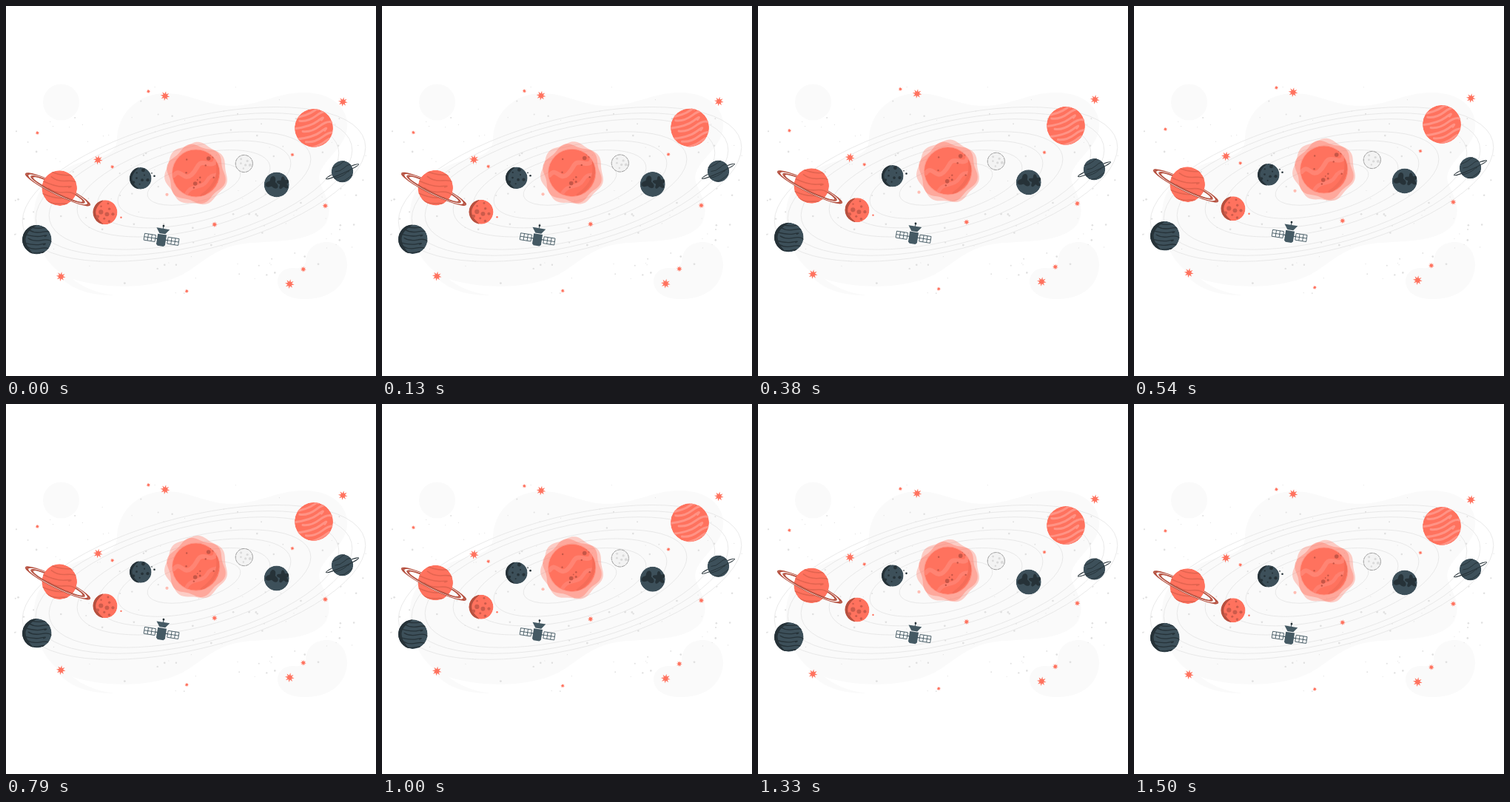
Recreate the animation shown at these times as an HTML page. Size 500 px wide and 500 px high, loop 1540 ms.

```html
<!DOCTYPE html>
<html lang="en">
<head>
<meta charset="utf-8">
<title>Solar system</title>
<style>
  html, body { margin: 0; height: 100%; overflow: hidden; background: #fff; }
  svg { display: block; width: 100vw; height: 100vh; }
</style>
</head>
<body>
<svg viewBox="0 0 500 500">
  <g fill="#fafafa">
    <circle cx="74.5" cy="130" r="24.5"/>
    <path d="M150 178C152 145 178 118 216 118C250 118 270 135 305 135C345 134 365 117 403 117C440 117 462 137 461 163C460 195 417 212 424 238C430 255 444 272 432 294C414 318 375 317 335 320C285 322 270 345 240 362C205 382 130 385 82 366C45 345 36 305 38 275C42 235 80 215 120 206C142 200 150 195 150 178Z"/>
    <path d="M405 345C406 328 418 319 434 319C451 319 461 333 461 350C460 376 440 395 408 396C383 397 367 388 367 371C368 358 380 353 390 354C399 355 404 352 405 345Z"/>
    <path d="M68 360Q92 392 147 391Q105 386 80 360Z"/>
  </g>
  <g id="dots"></g>
  <g id="orbits" fill="none" stroke="#e2e2e2" stroke-width=".7"></g>
  <g id="floating"></g>
</svg>
<script>
const CORAL = '#ff725e', RUST = '#b5503f', SLATE = '#455a64', DUSK = '#3d505a', NIGHT = '#263238';
const byId = id => document.getElementById(id);
const repeat = (count, draw) => Array.from({ length: count }, (_, i) => draw(i)).join('');
const circle = (x, y, r, fill) => `<circle cx="${x}" cy="${y}" r="${r}" fill="${fill}"/>`;
const path = (d, fill, extra = '') => `<path d="${d}" fill="${fill}" ${extra}/>`;
const line = (d, color, width) =>
  path(d, 'none', `stroke="${color}" stroke-width="${width}" stroke-linecap="round"`);
const place = (x, y, angle, content) =>
  `<g transform="translate(${x} ${y}) rotate(${angle})">${content}</g>`;

let seed = 7;
const random = (min = 0, max = 1) => {
  seed = seed * 16807 % 2147483647;
  return min + (max - min) * seed / 2147483647;
};

// Closed outline whose radius depends on the angle
function outline(steps, radius) {
  return 'M' + repeat(steps, i => {
    const a = i / steps * 2 * Math.PI, r = radius(a, i);
    return `${i ? 'L' : ''}${(r * Math.sin(a)).toFixed(2)} ${(-r * Math.cos(a)).toFixed(2)}`;
  }) + 'Z';
}
const star = (x, y, r) =>
  place(x, y, 10, path(outline(16, (a, i) => i % 2 ? r * .45 : r), CORAL));
const blob = (r, wave, lobes, phase, fill, opacity = 1) =>
  path(outline(90, a => r + wave * Math.sin(lobes * a + phase)), fill, `opacity="${opacity}"`);

let clips = 0;
function globe(r, fill, surface) {
  const id = 'clip' + clips++;
  return `<clipPath id="${id}"><circle r="${r}"/></clipPath>
    <g clip-path="url(#${id})">${circle(0, 0, r, fill)}${surface}</g>`;
}

// Surface features, all fitted to a globe of radius r
const bands = (r, count, color, width) => repeat(count, i => {
  const y = r * ((2 * i + 1) / count - 1), end = i % 2 ? r : r * .5;
  return line(`M${end - 1.6 * r} ${y}Q${-r * .2} ${y + r * .18} ${r * .3} ${y}T${end} ${y}`, color, width);
});
const craters = (r, count, color) => repeat(count, i => {
  const a = 2.4 * i + .8, d = r * .85 * Math.sqrt((i + .6) / count);
  return circle(d * Math.cos(a), d * Math.sin(a), r * random(.07, .2), color);
});
const shade = (r, color) => line(`M${-r * .3} ${-r}Q${-r * 1.5} 0 ${-r * .3} ${r}`, color, r * .25);

function sun() {
  const swirls = line('M-30 3C-21 -9 -17 12 -6 2S0 -17 16 -13S23 -26 31 -21', '#ff8473', 6) +
    line('M-13 28C-6 14 8 22 15 10S28 7 33 -2', '#ff8070', 5) +
    line('M29 -14Q34 12 8 30', '#f56c58', 4);
  const spots = (x, y) => place(x, y, 0, circle(0, 0, 2.8, '#c65647') +
    circle(6.5, -2, 1.5, '#c65647') + circle(3, -5, .9, '#c65647'));
  return place(257, 226.8, 0,
    blob(41.5, 1.7, 7, 1, CORAL, .34) + blob(38.5, 2.4, 6, 3, CORAL, .4) +
    place(-.3, -.8, 0, circle(0, 0, 32.6, '#ff9485') +
      globe(31.8, CORAL, swirls + spots(-1, 14) + place(17, -20, 0, spots(0, 0)) +
        craters(30, 6, '#c65647').replace(/ r="[^"]+"/g, ' r="1.2"'))) +
    circle(-39.5, 28, 2.1, '#ffbdb3'));
}

function saturn() {
  const arc = (rx, ry, sweep) => `A${rx} ${ry} 0 0 ${sweep} `;
  // A flat band between two ellipses, wider at its ends; sweep picks the back or front half
  const band = (outer, inner, sweep, fill) => path(
    `M${-outer} 0${arc(outer, outer * .16, sweep)}${outer} 0H${inner}` +
    `${arc(inner, inner * .125, 1 - sweep)}${-inner} 0Z`, fill);
  const ring = sweep => place(70, 247.9, 26, band(49, 44, sweep, RUST) +
    band(44, 41, sweep, '#fff') + band(41, 37, sweep, RUST));
  return ring(1) +
    place(72.2, 246.1, 15, globe(23.8, CORAL, bands(24, 6, '#e26450', 1.6))) + ring(0);
}

function uranus() {
  const ring = sweep => line(`M-24 0A24 2.4 0 0 ${sweep} 24 0`, NIGHT, .9);
  return place(454.5, 223.8, -24, ring(1) + globe(14.7, DUSK, bands(14.7, 4, NIGHT, .8)) + ring(0));
}

function satellite() {
  const panel = x => path(`M${x} -4.500h15v9h-15zm0 4.500h15m-10 -4.500v9m5 0v-9`,
    '#fff', `stroke="${SLATE}" stroke-width=".9"`);
  return place(210.2, 314.6, 9,
    line('M-8 .8H8', SLATE, 1.2) + place(0, .8, 0, panel(-23.5) + panel(8.5)) +
    path('M-6 -6H6V8L4 10H-4L-6 8Z', SLATE) +
    path('M-9 -14H9L4 -7H-4Z', SLATE) + line('M0 -14V-18', SLATE, 1) + circle(0, -17.7, 1.4, NIGHT));
}

const jupiter = () => place(416, 164.9, -17, globe(26, CORAL, bands(26, 7, '#ff9385', 3)));
const neptune = () => place(41.8, 315.7, 8,
  globe(19.8, DUSK, bands(19.8, 7, NIGHT, 1.3) + shade(19.8, NIGHT)));
const earth = () => place(365.7, 241.4, 0, globe(17, DUSK,
  place(-6, -2, 0, blob(7, 2.5, 3, 1, NIGHT)) + place(9, -2, 0, blob(7, 2, 5, 2, NIGHT))));
const mars = () => place(134, 278.8, 0,
  globe(16.5, CORAL, shade(16.5, RUST) + craters(16, 9, '#cc5b4b')) + circle(21.5, 7, 1.2, CORAL));
const venus = () => place(181.8, 232.9, 0,
  globe(14.8, DUSK, shade(14.8, NIGHT) + craters(14, 8, NIGHT)) +
  circle(18.7, -3.2, 1.3, NIGHT) + circle(15.2, -7, .8, NIGHT));
const moon = () => place(321.8, 213, 0,
  globe(11.8, '#f3f3f3', craters(10, 6, '#dadada')) +
  '<circle r="11.6" fill="none" stroke="#777" stroke-width=".7" stroke-dasharray="5 .6"/>');

// Star centres grouped by radius
const stars = {
  6.4: [[215, 121.6], [455.3, 129.5], [124.3, 208], [74.2, 365.6], [383.3, 375.6]],
  4: [[431.5, 270], [281.8, 295.2], [401.8, 355.7]],
  2.9: [[42.4, 171.5], [192.4, 115.4], [143.7, 217.3], [387, 201], [244.2, 385.4]],
};

byId('dots').innerHTML = repeat(150, i => {
  const x = random(12, 488), spread = 70 + 75 * Math.sin(Math.PI * x / 500);
  return circle(x, 245 + random(-spread, spread), i % 2 ? .6 : random(.9, 1.4), '#e0e0e0');
});

byId('orbits').innerHTML = [232, 214, 196, 158, 131, 103, 63].map(extent =>
  place(254, 240.9, -14.2, `<ellipse rx="${extent * 1.026}" ry="${extent * .385}"/>`)).join('');

const floating = byId('floating');
floating.innerHTML =
  [sun, jupiter, saturn, neptune, uranus, earth, mars, venus, moon, satellite].map(draw => draw()).join('') +
  Object.entries(stars).map(([r, list]) => list.map(([x, y]) => star(x, y, r)).join('')).join('');

// Everything in front bobs up and down together, in 37 steps per loop
const LOOP = 1540, STEPS = 37, LIFT = 6;
function frame(now) {
  const step = Math.floor(now % LOOP / LOOP * STEPS + .1);
  const phase = (step + .5) / STEPS * 2 * Math.PI;
  const y = -LIFT * (1 - Math.cos(phase)) / 2;
  floating.setAttribute('transform', `translate(0 ${y.toFixed(3)})`);
  requestAnimationFrame(frame);
}
frame(0);
</script>
</body>
</html>
```
